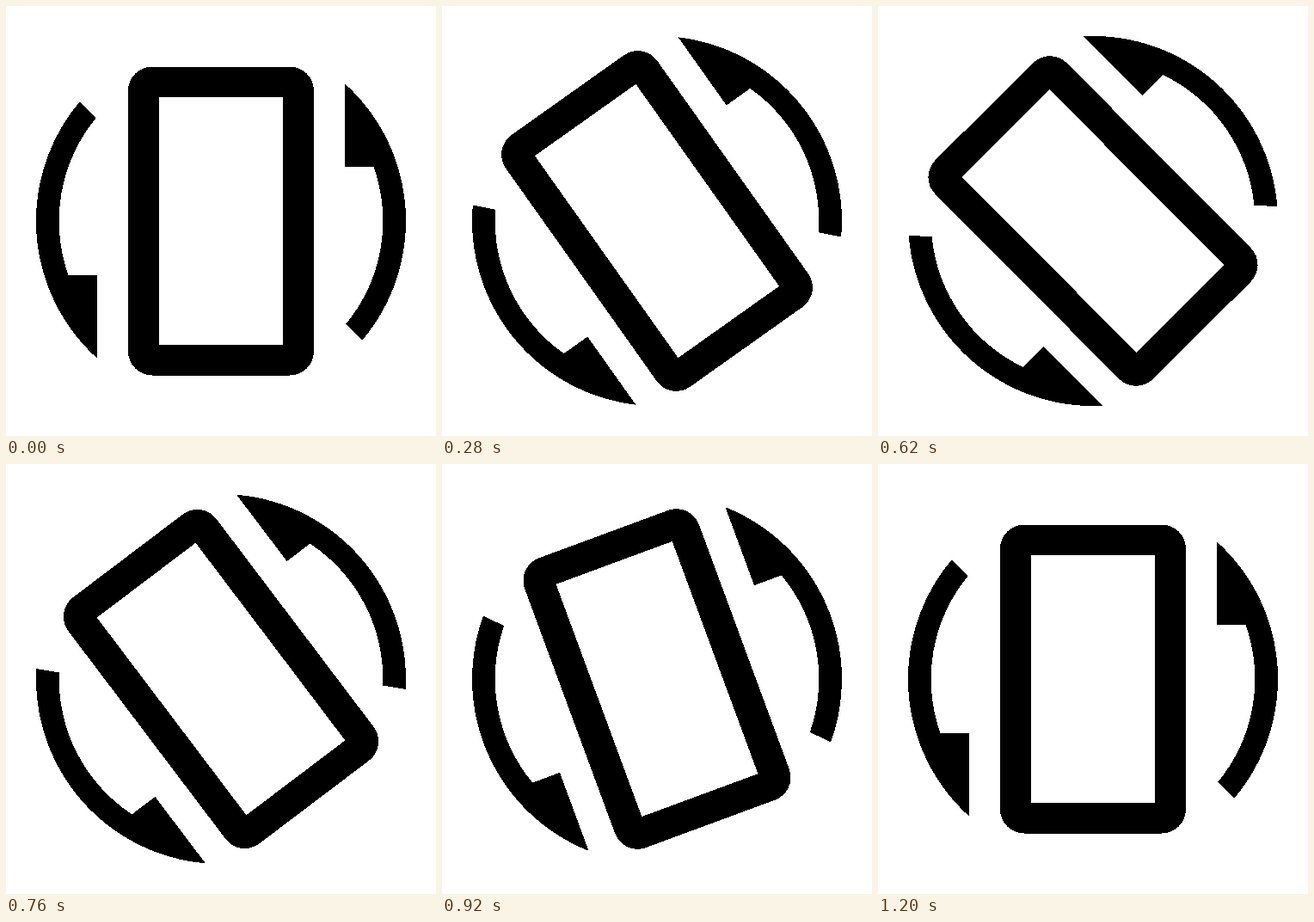
An HTML page for the animation above (1.32 s loop, 500 px wide and 500 px high).

```html
<!DOCTYPE html>
<html lang="en">
<head>
<meta charset="utf-8">
<title>Rotate device</title>
<style>
  html, body { margin: 0; width: 100%; height: 100%; overflow: hidden; background: #fff; }
  svg { display: block; width: 100vw; height: 100vh; }
</style>
</head>
<body>
<svg viewBox="-250 -250 500 500" shape-rendering="crispEdges">
  <defs>
    <path id="arrow" d="M-143.7 160A215 215 0 0 1 -164 -139L-145.5 -119.5A188.3 188.3 0 0 0 -177.5 63H-143.7Z"/>
  </defs>
  <g id="icon">
    <path fill-rule="evenodd" d="M-80 -179.5H80A28 28 0 0 1 108 -151.5V151.5A28 28 0 0 1 80 179.5H-80A28 28 0 0 1 -108 151.5V-151.5A28 28 0 0 1 -80 -179.5ZM-72 -144V144H72V-144Z"/>
    <use href="#arrow"/>
    <use href="#arrow" transform="rotate(180)"/>
  </g>
</svg>
<script>
  const LOOP = 1320, HALF = 600, STEP = 20, TILT = -45;
  const icon = document.getElementById('icon');

  const smooth = s => s * s * (3 - 2 * s);

  // Cubic bezier easing with handles (a, 0) and (b, 1)
  function bezier(a, b, t) {
    let lo = 0, hi = 1;
    for (let i = 0; i < 30; i++) {
      const s = (lo + hi) / 2, r = 1 - s;
      const x = 3 * a * s * r * r + 3 * b * s * s * r + s * s * s;
      if (x < t) lo = s; else hi = s;
    }
    return smooth((lo + hi) / 2);
  }

  function angle(ms) {
    if (ms <= 0 || ms >= 2 * HALF) return 0;
    return TILT * (ms < HALF
      ? bezier(0.32, 0.14, ms / HALF)
      : 1 - smooth(ms / HALF - 1));
  }

  let start;
  function draw(now) {
    start ??= now;
    const ms = Math.floor(((now - start) % LOOP) / STEP + 1e-6) * STEP;
    icon.setAttribute('transform', `rotate(${angle(ms).toFixed(3)})`);
    requestAnimationFrame(draw);
  }
  requestAnimationFrame(draw);
</script>
</body>
</html>
```
